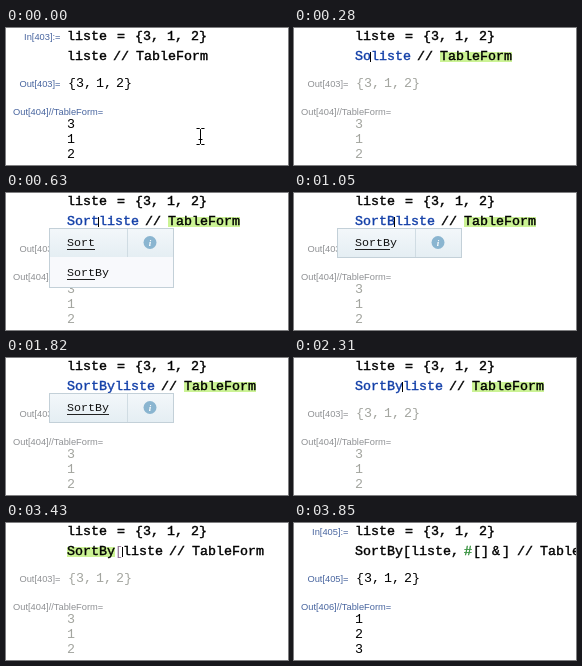
Animation of 282 by 137 pixels, one loop 4550 ms. Source, as an HTML page:

```html
<!DOCTYPE html>
<html>
<head>
<meta charset="utf-8">
<style>
  html, body { margin: 0; width: 100%; height: 100%; overflow: hidden; background: #fff; }
  svg { display: block; width: 100vw; height: 100vh; }
  text { white-space: pre; font: 13.33px "Liberation Mono", monospace; }
  .code { stroke: currentColor; stroke-width: .4px; }
  .label { font: 9.3px "Liberation Sans", sans-serif; }
  .output { word-spacing: -4px; }
  .item { font-size: 11.67px; }
  .info { font: italic bold 9px "Liberation Serif", serif; }
</style>
</head>
<body>
<svg id="stage" viewBox="0 0 282 137"></svg>
<script>
const DURATION = 4550;
const LEFT = 61, CHAR = 8;
const BLUE = '#123fa8', GREEN = '#2f8d37', LABEL = '#48659f', FADED = '#a3a59f';

const soItems = ['Solve', 'SoundNote', 'Sow', 'Sound'];
const sortItems = ['Sort', 'SortBy'];

// Each step starts at `at` and holds until the next one.
const steps = [
  { at: 0, mode: 'idle', mouse: true },
  { at: 70, typed: 'S', caret: true },
  { at: 280, typed: 'So', caret: true },
  { at: 420, typed: 'So', caret: true, items: soItems, match: 2, width: 166 },
  { at: 490, typed: 'Sor', caret: true, items: soItems, match: 2, width: 166 },
  { at: 560, typed: 'Sor', caret: true, items: sortItems, match: 3 },
  { at: 630, typed: 'Sort', caret: true, items: sortItems, match: 4 },
  { at: 1050, typed: 'SortB', caret: true, items: ['SortBy'], match: 5 },
  { at: 1330, typed: 'SortBy', caret: true, items: ['SortBy'], match: 6 },
  { at: 1820, typed: 'SortBy', items: ['SortBy'], match: 6 },
  { at: 2310, typed: 'SortBy', caret: true },
  { at: 2380, typed: 'SortBy[', caret: true },
  { at: 2940, typed: 'SortBy[' },
  { at: 3360, typed: 'SortBy[', mouse: true },
  { at: 3430, typed: 'SortBy[', caret: true },
  { at: 3640, mode: 'complete', caret: true },
  { at: 3850, mode: 'done' }
];

const text = (x, y, string, cls = 'code', fill = '#000', extra = '') =>
  `<text x="${x}" y="${y}" class="${cls}" color="${fill}" fill="${fill}" ${extra}>${string.replace(/&/g, '&amp;')}</text>`;
const rect = (x, y, w, h, fill, extra = '') =>
  `<rect x="${x}" y="${y}" width="${w}" height="${h}" fill="${fill}" ${extra}/>`;
const label = (y, string, fill) => text(54.5, y, string, 'label', fill, 'text-anchor="end"');
const highlight = (x, chars) => rect(x, 24, chars * CHAR, 10, '#cbf394');

function tableForm(end, marked) {
  return (marked ? highlight(end + 29, 9) : '') +
    text(end + 6, 32, '//') + text(end + 29, 32, 'TableForm');
}

function inputLine({ mode, typed = '', caret }) {
  let out, end, caretX = LEFT - 1 + typed.length * CHAR;
  if (mode === 'complete' || mode === 'done') {
    end = 217;
    caretX = end - 1;
    out = text(LEFT, 32, 'SortBy[liste,') + text(170, 32, '#', 'code', GREEN) +
      text(179, 32, '[]') + text(198, 32, '&') + text(208, 32, ']') +
      tableForm(end, mode === 'complete');
  } else {
    const open = typed.endsWith('[');
    end = LEFT + (typed.length + 5) * CHAR;
    out = tableForm(end, typed && !open);
    out += open
      ? highlight(LEFT, 6) + text(LEFT, 32, 'SortBy') +
        text(LEFT + 48, 32, '[', 'output', '#8d6f91') + text(LEFT + 56, 32, 'liste')
      : text(LEFT, 32, typed + 'liste', 'code', typed ? BLUE : '#000');
  }
  return out + (caret ? rect(caretX, 24, 1, 10, '#000') : '');
}

function outputs(mode) {
  const fresh = mode === 'idle' || mode === 'done';
  const number = mode === 'done' ? 405 : 403;
  const labelColor = fresh ? LABEL : '#8f9194';
  const color = fresh ? '#000' : FADED;
  const values = mode === 'done' ? [1, 2, 3] : [3, 1, 2];
  return (fresh ? label(12, `In[${number}]:=`, labelColor) : '') +
    label(59, `Out[${number}]=`, labelColor) +
    text(LEFT + 1, 59, '{3, 1, 2}', 'output', color) +
    text(7, 87, `Out[${number + 1}]//TableForm=`, 'label', labelColor) +
    values.map((v, i) => text(LEFT, 100 + i * 15, String(v), 'output', color)).join('');
}

function popup({ items, match, width = 124 }) {
  if (!items) return '';
  const right = 43 + width;
  const iconX = right - 23;
  let out = rect(43.5, 35.5, width, items.length * 30 - 1, '#f8f9fc', 'stroke="#c3d0d8"') +
    rect(44, 36, width - 1, 28, 'url(#selected)') +
    rect(right - 46, 36, 1, 28, '#d0dce3') +
    `<circle cx="${iconX}" cy="49.5" r="6.5" fill="#8ab5d0"/>` +
    text(iconX, 52.5, 'i', 'info', '#fff', 'text-anchor="middle"');
  items.forEach((item, i) => {
    const y = 53 + i * 30;
    out += text(LEFT, y, item, 'item', '#111') + rect(LEFT, y + 3, match * 7, 1, '#222');
  });
  return out;
}

const mouse = '<path d="M190.5 100.5h3l1 1l1-1h3M194.5 101.5v14M190.5 116.5h3l1-1l1 1h3M192.5 111.5h4" fill="none" stroke="#000"/>';
const defs = `<defs><linearGradient id="selected" x2="0" y2="1">
  <stop stop-color="#f3f7fa"/><stop offset="1" stop-color="#e5eef3"/></linearGradient></defs>`;

const stage = document.getElementById('stage');
let shown;

function draw(step) {
  stage.innerHTML = defs + text(LEFT, 12, 'liste') + text(111, 12, '=') +
    text(129, 12, '{3, 1, 2}') + outputs(step.mode) + inputLine(step) +
    popup(step) + (step.mouse ? mouse : '');
}

function tick() {
  const time = performance.now() % DURATION;
  const step = steps.findLast(s => s.at <= time);
  if (step !== shown) draw(shown = step);
  requestAnimationFrame(tick);
}
tick();
</script>
</body>
</html>
```
